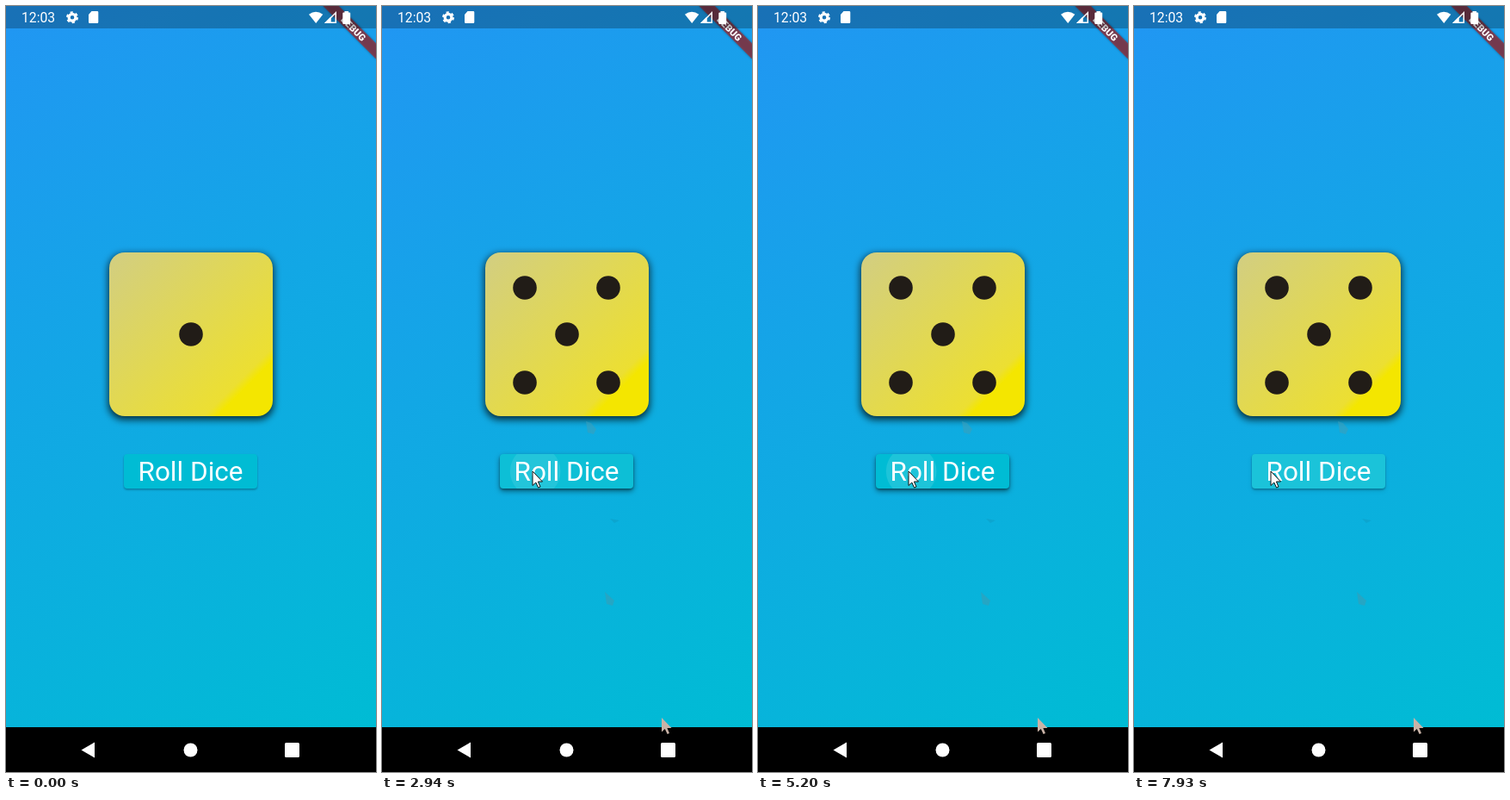
Write an HTML page that moves like this. It is 430x889 px and loops after 8 s.

```html
<!DOCTYPE html>
<html lang="en">
<head>
<meta charset="utf-8">
<title>Roll Dice</title>
<style>
  html, body { margin: 0; width: 100%; height: 100%; overflow: hidden; background: #000; }
  svg { display: block; width: 100%; height: 100%; }
  text { font-family: Roboto, sans-serif; fill: #fff; }
</style>
</head>
<body>
<svg viewBox="0 0 430 889">
  <defs>
    <linearGradient id="sky" gradientUnits="userSpaceOnUse" x1="0" y1="0" x2="430" y2="837">
      <stop stop-color="#2196f3"/><stop offset="1" stop-color="#00bcd4"/>
    </linearGradient>
    <linearGradient id="gold" x1="0" y1="0" x2="1" y2="1">
      <stop stop-color="#d2ce82"/><stop offset=".79" stop-color="#ecdf32"/>
      <stop offset=".83" stop-color="#f4e600"/>
    </linearGradient>
    <filter id="soft" x="-20%" y="-20%" width="140%" height="140%"><feGaussianBlur stdDeviation="4"/></filter>
    <filter id="near" x="-20%" y="-50%" width="140%" height="200%"><feGaussianBlur stdDeviation="1.2"/></filter>
    <filter id="far" x="-20%" y="-50%" width="140%" height="200%"><feGaussianBlur stdDeviation="3"/></filter>
    <clipPath id="inButton"><rect x="137" y="520" width="155" height="40" rx="4"/></clipPath>
    <clipPath id="inPage"><rect width="430" height="837"/></clipPath>
    <path id="arrow" d="M0 0V16.5L3.8 13 6.6 19 9 18 6.4 12H11.5Z"/>
  </defs>

  <rect width="430" height="837" fill="url(#sky)"/>

  <g transform="translate(430 0) rotate(45)">
    <rect x="-44" y="30.5" width="88" height="13" opacity=".35" filter="url(#near)"/>
    <rect x="-44" y="30.5" width="88" height="13" fill="#b71c1c" fill-opacity=".6"/>
    <text y="41" font-size="11" font-weight="900" text-anchor="middle">DEBUG</text>
  </g>

  <rect width="430" height="26" fill-opacity=".25"/>
  <text x="18" y="19.2" font-size="15.7">12:03</text>
  <g fill="#fff">
    <circle cx="77" cy="13.3" r="3.9" fill="none" stroke="#fff" stroke-width="3.2"/>
    <circle cx="77" cy="13.3" r="5.9" fill="none" stroke="#fff" stroke-width="2.2" stroke-dasharray="3.1 3.08"/>
    <path d="M99.5 6H106a1.3 1.3 0 0 1 1.3 1.3V18.700a1.300 1.300 0 0 1-1.300 1.300H97.300a1.300 1.300 0 0 1-1.300-1.300V10Z"/>
    <path d="M352 9.800Q360 3.500 368.300 9.800L360.200 20Z"/>
    <path d="M384 6V20H370ZM382.500 9.600L377.500 14.600V18.500H382.500Z" fill-rule="evenodd"/>
    <path d="M370 20L377.500 12.500V20Z"/>
    <path d="M393.500 7.500V6H398V7.500H399.200a1 1 0 0 1 1 1V20a1 1 0 0 1-1 1H392.300a1 1 0 0 1-1-1V8.500a1 1 0 0 1 1-1Z"/>
  </g>

  <rect x="119" y="288" width="192" height="192" rx="18" fill-opacity=".75" filter="url(#soft)"/>
  <rect x="120" y="286" width="190" height="190" rx="18" fill="url(#gold)"/>
  <g id="pips" fill="#211c17"></g>

  <rect x="137" y="521.500" width="155" height="40" rx="4" fill-opacity=".3" filter="url(#near)"/>
  <rect id="lift" x="137" y="523" width="155" height="40" rx="4" fill-opacity=".45" filter="url(#far)"/>
  <rect x="137" y="520" width="155" height="40" rx="4" fill="#00bcd4"/>
  <g id="ripples" clip-path="url(#inButton)" fill="#fff"></g>
  <text x="214.500" y="550.500" font-size="31.500" text-anchor="middle">Roll Dice</text>

  <rect y="837" width="430" height="52"/>
  <g fill="#fff">
    <path d="M87.500 863.500L103 854.500V872.500Z"/>
    <circle cx="214.500" cy="863.500" r="8"/>
    <rect x="324" y="855" width="17" height="17" rx="1.500"/>
  </g>

  <g id="trail">
    <use href="#arrow" x="325" y="826" fill="#c9b3a7" clip-path="url(#inPage)"/>
    <path d="M259 680L270 690 268 696 261 694Z" fill="#5f8d9c" opacity=".35"/>
    <path d="M265 595L276 597 270 600Z" fill="#1585a8" opacity=".25"/>
    <path d="M237 482L243 484 249 491 246 497 239 495Z" fill="#3f9fb8" opacity=".55"/>
  </g>
  <circle id="halo" r="12.300" fill="#f6f23c" fill-opacity=".6"/>
  <use id="cursor" href="#arrow" stroke="#111" stroke-width="1"/>
</svg>
<script>
const LOOP = 8000;
const $ = id => document.getElementById(id);
const clamp = v => Math.max(0, Math.min(1, v));

function add(parent, attrs) {
  const node = document.createElementNS('http://www.w3.org/2000/svg', 'circle');
  for (const key in attrs) node.setAttribute(key, attrs[key]);
  return parent.appendChild(node);
}
const set = (node, attrs) => { for (const key in attrs) node.setAttribute(key, attrs[key]); };

// time, x, y of the pointer tip
const path = [
  [280, 325, 826], [350, 261, 681], [420, 265, 595], [490, 262, 577], [680, 262, 577],
  [800, 237, 483], [900, 222, 445], [1260, 175, 540], [5750, 175, 540], [5980, 278, 547],
  [7000, 278, 547], [7250, 159, 540]
];

// press time and the number rolled
const presses = [
  [1390, 5], [2000, 5], [2400, 5], [2800, 4], [3200, 6], [3530, 4], [3800, 1], [4310, 5],
  [5050, 2], [5560, 2], [6110, 2], [6290, 2], [6560, 2], [7460, 5]
];

// each pip: x, y and the faces that show it
const pips = [
  [166, 327, '456'], [263, 327, '23456'], [166, 382, '6'], [215, 381, '135'],
  [263, 382, '6'], [166, 437, '23456'], [263, 437, '456']
].map(([cx, cy, faces]) => ({ faces, node: add($('pips'), { cx, cy, r: 13.8 }) }));

const ripples = presses.map(() => add($('ripples'), {}));
const ghosts = [...$('trail').children];
const ghostTimes = [350, 420, 490, 870];

function pointerAt(time) {
  const next = path.findIndex(p => p[0] > time);
  if (next < 0) return path[path.length - 1].slice(1);
  if (next === 0) return path[0].slice(1);
  const [t0, x0, y0] = path[next - 1], [t1, x1, y1] = path[next];
  const u = (time - t0) / (t1 - t0);
  return [x0 + (x1 - x0) * u, y0 + (y1 - y0) * u];
}

function drawRipple(node, press, time) {
  const age = time - press - 130;
  const visible = age >= 0 && age < 480;
  node.style.display = visible ? '' : 'none';
  if (!visible) return;
  const [x, y] = pointerAt(press);
  const spread = clamp((age - 80) / 225);
  const grow = 0.08 + 0.92 * (1 - (1 - spread) ** 2);
  set(node, {
    cx: x + (214.5 - x) * grow,
    cy: y + (540 - y) * grow,
    r: 24.5 + 61 * grow,
    opacity: 0.165 * clamp((age + 30) / 75) * (1 - clamp((age - 260) / 220))
  });
}

function draw(time) {
  let face = 1, lift = 0, held = false;
  presses.forEach(([press, roll], i) => {
    const age = time - press;
    if (age >= 215) face = roll;
    if (age >= 0 && age < 130) held = true;
    lift = Math.max(lift, clamp((age - 70) / 70) * (1 - clamp((age - 340) / 160)));
    drawRipple(ripples[i], press, time);
  });
  pips.forEach(p => p.node.style.display = p.faces.includes(face) ? '' : 'none');
  ghosts.forEach((g, i) => g.style.display = time >= ghostTimes[i] ? '' : 'none');
  set($('lift'), { opacity: lift });

  const [x, y] = pointerAt(Math.floor(time / 70) * 70);
  set($('cursor'), { x, y, fill: held ? '#ffffc4' : '#fff' });
  set($('halo'), { cx: x, cy: y });
  $('cursor').style.display = time >= 280 ? '' : 'none';
  $('halo').style.display = held ? '' : 'none';
}

const start = performance.now();
function tick() {
  draw((performance.now() - start) % LOOP);
  requestAnimationFrame(tick);
}
tick();
</script>
</body>
</html>
```
